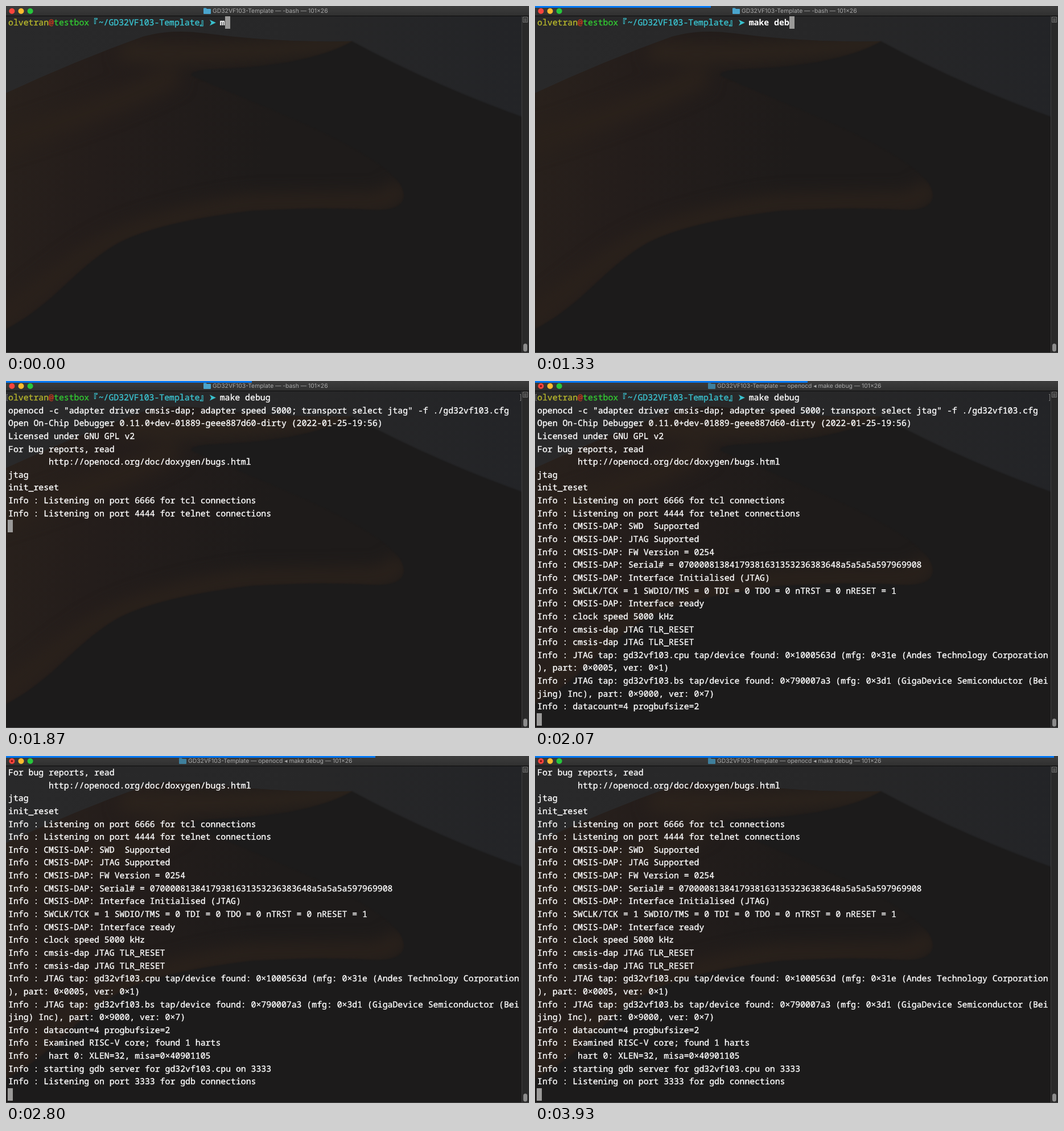
Animation of 919 by 610 pixels, one loop 3.99 s. Source, as an HTML page:

```html
<!DOCTYPE html>
<html lang="en">
<head>
<meta charset="utf-8">
<title>Terminal</title>
<style>
  html, body { margin: 0; width: 100%; height: 100%; overflow: hidden; background: #1b1b1b; }
  #stage { position: relative; width: 919px; height: 610px; overflow: hidden; text-rendering: geometricPrecision; }
  #stage > * { position: absolute; }
  #screen {
    left: 4px; top: 18px; color: #fff; white-space: pre;
    font: 500 14.82px/22.65px "Noto Sans Mono", "DejaVu Sans Mono", monospace;
    font-variant-ligatures: none;
    -webkit-text-stroke: .35px;
  }
  #screen div { position: relative; height: 22.65px; }
  #screen i { position: absolute; top: 0; width: 9px; height: 22px; background: #9b9a99; }
  #screen div > i:first-child { left: -1px; }
  #screen u { position: absolute; top: 5px; width: 2px; height: 12px; border: 1px solid #777; box-sizing: border-box; }
  .open { left: -3px; border-right: 0 !important; }
  .close { left: 899px; border-left: 0 !important; }
  .wide { display: inline-block; width: 2ch; font-family: "Noto Sans CJK JP", "Noto Sans CJK", "DejaVu Sans", sans-serif; }
  .arrow { font-family: "DejaVu Sans", sans-serif; }
  .user { color: #b6b62c; } .at { color: #c8391f; } .host { color: #32c832; } .path { color: #3ac3d0; }
  .typing { font-weight: 600; -webkit-text-stroke: 0; }
  #title {
    top: 2px; color: #a9a9a9; white-space: pre;
    font: 10.35px/14px Inter, "Liberation Sans", sans-serif;
  }
  #bar { left: 0; top: 0; height: 3px; background: #0578f5; }
</style>
</head>
<body>
<div id="stage">
  <svg width="919" height="610" color-interpolation-filters="sRGB">
    <defs>
      <linearGradient id="sky"><stop stop-color="#29292a"/><stop offset=".6" stop-color="#272728"/><stop offset="1" stop-color="#232427"/></linearGradient>
      <linearGradient id="sand" gradientUnits="userSpaceOnUse" x1="0" y1="150" x2="460" y2="260">
        <stop stop-color="#29211c"/><stop offset=".4" stop-color="#241d1b"/><stop offset="1" stop-color="#1e1b1a"/>
      </linearGradient>
      <linearGradient id="head" x2="0" y2="1"><stop stop-color="#3d3d3d"/><stop offset="1" stop-color="#303030"/></linearGradient>
      <filter id="soft"><feGaussianBlur stdDeviation="1"/></filter>
      <filter id="glow" filterUnits="userSpaceOnUse" x="-60" y="0" width="1000" height="660"><feGaussianBlur stdDeviation="14"/></filter>
      <clipPath id="dune"><path d="M0 153Q120 97 240 54Q290 40 350 48Q480 65 608 62L720 380L0 610Z"/></clipPath>
    </defs>
    <rect width="919" height="610" fill="url(#sky)"/>
    <g clip-path="url(#dune)">
      <rect width="919" height="610" fill="url(#sand)"/>
      <g fill="none" filter="url(#glow)">
        <path d="M-60 255Q160 190 300 120" stroke="#2a211b" stroke-width="40"/>
        <path d="M200 80Q420 92 640 56" stroke="#2c231c" stroke-width="36"/>
        <path d="M-60 580C90 490 110 440 220 398Q330 360 430 348L640 345Q690 342 690 310" stroke="#2a211b" stroke-width="36"/>
      </g>
    </g>
    <path filter="url(#soft)" fill="#1c1b1b" d="M608 62C560 90 480 105 400 109C350 112 326 112 325 122
      C420 165 560 215 640 268C682 295 700 316 699 335C697 355 672 360 640 358
      C570 354 500 356 430 360C350 370 260 385 200 415C120 460 90 520 0 568V620H930V203Q760 144 608 62Z"/>
    <rect width="919" height="17" fill="url(#head)"/>
    <rect y="17" width="919" height="1" fill="#0c0c0c"/>
    <circle cx="10.4" cy="9" r="5" fill="#f9443c"/>
    <circle cx="26.5" cy="9" r="5" fill="#fdbb2f"/>
    <circle cx="42.6" cy="9" r="5" fill="#27c73c"/>
    <circle id="busy" cx="10.4" cy="9" r="1.8" fill="#7c0d0a"/>
    <path id="folder" d="M0 4.5Q0 3.5 1 3.5H4.5L6 5H12Q13 5 13 6V13Q13 14 12 14H1Q0 14 0 13Z"/>
    <rect x="906" y="18" width="13" height="592" fill="#292929"/>
    <rect x="906" y="18" width="1" height="592" fill="#404040"/>
    <path d="M908.5 19.5h8v9h-8zM910 22.5h5M910 24.5h5M910 26.5h5" fill="none" stroke="#777"/>
    <rect x="909" y="593.5" width="7" height="14" rx="3.5" fill="#8b8b8b"/>
    <rect y="609" width="919" height="1" fill="#484848"/>
  </svg>
  <div id="title"></div>
  <div id="screen"></div>
  <div id="bar"></div>
</div>
<script>
const $ = id => document.getElementById(id);
const LOOP = 3990, ROWS = 26, COMMAND = "make debug";
const keyTicks = [0, 3, 5, 7, 11, 13, 15, 18, 21, 23];
// [tick, number of lines printed by then]
const prints = [[25, 2], [26, 10], [30, 18], [31, 25], [32, 29]];
const BUSY_TICK = 29;

const span = (name, text) => `<span class="${name}">${text}</span>`;
const prompt = span("user", "olvetran") + span("at", "@") + span("host", "testbox") +
  span("path", span("wide", "『") + "~/GD32VF103-Template" + span("wide", "』") + span("wide arrow", "➤"));
const cursor = "<i></i>";

const info = `Listening on port 6666 for tcl connections
Listening on port 4444 for telnet connections
CMSIS-DAP: SWD  Supported
CMSIS-DAP: JTAG Supported
CMSIS-DAP: FW Version = 0254
CMSIS-DAP: Serial# = 07000081384179381631353236383648a5a5a5a597969908
CMSIS-DAP: Interface Initialised (JTAG)
SWCLK/TCK = 1 SWDIO/TMS = 0 TDI = 0 TDO = 0 nTRST = 0 nRESET = 1
CMSIS-DAP: Interface ready
clock speed 5000 kHz
cmsis-dap JTAG TLR_RESET
cmsis-dap JTAG TLR_RESET
JTAG tap: gd32vf103.cpu tap/device found: 0×1000563d (mfg: 0×31e (Andes Technology Corporation
), part: 0×0005, ver: 0×1)
JTAG tap: gd32vf103.bs tap/device found: 0×790007a3 (mfg: 0×3d1 (GigaDevice Semiconductor (Bei
jing) Inc), part: 0×9000, ver: 0×7)
datacount=4 progbufsize=2
Examined RISC-V core; found 1 harts
 hart 0: XLEN=32, misa=0×40901105
starting gdb server for gd32vf103.cpu on 3333
Listening on port 3333 for gdb connections`.split("\n")
  .map(s => /^(\)|jing)/.test(s) ? s : "Info : " + s);

const lines = [
  '<u class="open"></u>' + prompt + COMMAND + '<u class="close"></u>',
  'openocd -c "adapter driver cmsis-dap; adapter speed 5000; transport select jtag" -f ./gd32vf103.cfg',
  "Open On-Chip Debugger 0.11.0+dev-01889-geee887d60-dirty (2022-01-25-19:56)",
  "Licensed under GNU GPL v2",
  "For bug reports, read",
  "        http://openocd.org/doc/doxygen/bugs.html",
  "jtag",
  "init_reset",
  ...info
];

function screenRows(tick) {
  const printed = prints.filter(([at]) => at <= tick).pop();
  if (printed) return [...lines.slice(0, printed[1]), cursor].slice(-ROWS);
  const typed = keyTicks.filter(at => at <= tick).length;
  return [prompt + span("typing", COMMAND.slice(0, typed)) + cursor];
}

let shownHtml = "";
function draw(tick) {
  const html = screenRows(tick).map(row => `<div>${row}</div>`).join("");
  if (html !== shownHtml) $("screen").innerHTML = shownHtml = html;

  const busy = tick >= BUSY_TICK, left = busy ? 304 : 347;
  $("title").textContent = `GD32VF103-Template — ${busy ? "openocd ◂ " + COMMAND : "-bash"} — 101×26`;
  $("title").style.left = left + 16 + "px";
  $("folder").setAttribute("transform", `translate(${left} 0)`);
  $("folder").setAttribute("fill", busy ? "#3f7f9c" : "#4aa5cd");
  $("busy").style.display = busy ? "" : "none";
  $("bar").style.width = Math.floor(tick * 15.46) + "px";
}

// Fifteen ticks a second, rounded to steps of 70, 60 and 70 ms.
function tickAt(ms) {
  const rest = ms % 200;
  return 3 * Math.floor(ms / 200) + (rest >= 70) + (rest >= 130);
}

let shownTick = -1;
function loop() {
  const tick = tickAt(performance.now() % LOOP);
  if (tick !== shownTick) draw(shownTick = tick);
  requestAnimationFrame(loop);
}
loop();
</script>
</body>
</html>
```
